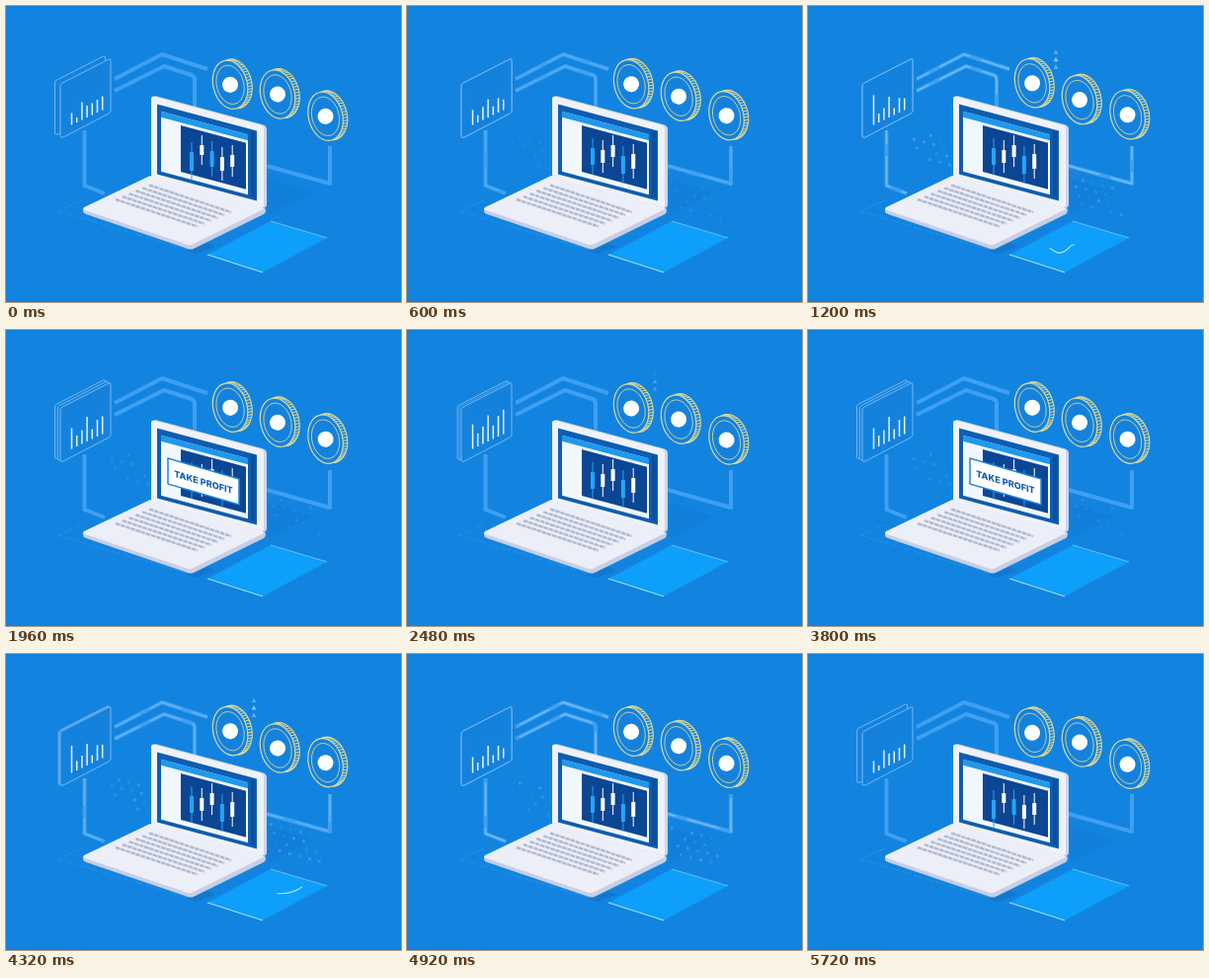
An HTML page for the animation above (5760 ms loop, 400x300 px).

```html
<!DOCTYPE html>
<html lang="en">
<head>
<meta charset="utf-8">
<title>Take profit</title>
<style>
html, body { margin: 0; width: 100%; height: 100%; overflow: hidden; background: #1284df; }
svg { display: block; width: 400px; height: 300px; }
text { font: 800 9.1px Inter, "Open Sans", sans-serif; }
</style>
</head>
<body>
<svg viewBox="0 0 400 300" fill="none" stroke-linejoin="round">
  <rect width="400" height="300" fill="#1284df"/>

  <!-- floor traces and shadow -->
  <path d="M264 174L312 189L266 211Z" fill="#117fda"/>
  <path d="M78 197L53 208L184 247" stroke="#3d9ce8" stroke-width=".7" stroke-dasharray="9 3" opacity=".65"/>
  <path d="M182 248L204 240L212 244L192 251Z" fill="#1078d0"/>

  <g id="cables" stroke="#3f9ff1" stroke-width="4"></g>
  <g id="flow" stroke="#9bd0fb" stroke-width="1.4" stroke-dasharray="34 12"></g>

  <g id="dots" fill="#5598e2"></g>
  <g id="panel"></g>
  <g id="bars" stroke="#e6f3ff" stroke-width="1.5"></g>
  <g id="coins"></g>
  <g id="arrows" fill="#8cc6f8"></g>

  <!-- card -->
  <path d="M204 252L268 218L325 235L260 270Z" fill="#0d9ff9"/>
  <path d="M204 252L260 270" stroke="#b5e2ff" stroke-width="1"/>
  <path d="M268 218L325 235" stroke="#79cbfb" stroke-width=".8"/>
  <path id="wave" d="M226 256C232 247 238 241 244 245S253 252 259 249S265 242 269 242S286 246 300 236"
    pathLength="100" stroke="#b9e4ff" stroke-width="1.2"/>

  <!-- laptop base -->
  <path d="M78 205V208Q78 210 81 211L184 246Q187 247 190 246L261 211Q263 210 263 206Z" fill="#c6cfe6"/>
  <path d="M79 204L146 172L263 205L190 241Q187 243 184 242L80 207Q77 206 79 204Z" fill="#eceef8"/>
  <g id="keys" stroke="#b3bbcf" stroke-width="2.5" stroke-dasharray="4.6 .8"></g>

  <!-- laptop lid -->
  <g transform="matrix(1 .267 0 1 147 91)">
    <rect x="1" y="-1" width="116" height="84" rx="4" fill="#cdd6ec"/>
    <rect width="114" height="83" rx="3" fill="#f0f2fb"/>
    <rect x="6" y="7" width="101" height="71" fill="#0e5db0"/>
    <rect x="101" y="9" width="4" height="66" fill="#0c4f9d"/>
    <rect x="10" y="13" width="88" height="61" fill="#f1f7ff"/>
    <rect x="10" y="13" width="88" height="6" fill="#1e98ee"/>
    <rect x="30" y="22" width="66" height="47" fill="#0b4695"/>
  </g>
  <g id="candles"></g>
  <g id="popup" transform="matrix(1 .29 0 1 164 130)">
    <rect width="72" height="26" fill="#fff" stroke="#1b86df" stroke-width="1.5"/>
    <text x="36" y="17" text-anchor="middle" fill="#0f5fb4">TAKE PROFIT</text>
  </g>
</svg>
<script>
const LOOP = 5760, HALF = LOOP / 2;
const $ = id => document.getElementById(id);

function set(el, attrs) {
  for (const k in attrs) el.setAttribute(k, attrs[k]);
}
function add(parent, tag, attrs) {
  const el = document.createElementNS("http://www.w3.org/2000/svg", tag);
  set(el, attrs);
  parent.appendChild(el);
  return el;
}
const clamp = x => Math.max(0, Math.min(1, x));
const ease = x => x * x * (3 - 2 * x);
const ramp = (t, a, b) => ease(clamp((t - a) / (b - a)));
const gate = (t, a, b, c, d) => ramp(t, a, b) * (1 - ramp(t, c, d));

// Eased value lists: each step is [time, values]
function sample(steps, t) {
  let i = 0;
  while (i < steps.length - 2 && t >= steps[i + 1][0]) i++;
  const [a, from] = steps[i], [b, to] = steps[i + 1];
  const k = ramp(t, a, b);
  return from.map((v, n) => v + (to[n] - v) * k);
}

const BAR_STEPS = [
  [0, [12, 5, 18, 12, 12, 13, 14]],
  [840, [16, 8, 12, 20, 8, 15, 10]],
  [1200, [30, 9, 12, 21, 7, 15, 12]],
  [1900, [21, 11, 14, 25, 10, 17, 18]],
  [2060, [21, 11, 14, 25, 10, 17, 18]],
  [2680, [26, 14, 19, 27, 15, 22, 27]],
  [2880, [26, 14, 19, 27, 15, 22, 27]]
];
// top and height of each candle body
const CANDLE_STEPS = [
  [0, [148, 19, 141, 10, 147, 16, 153, 14, 151, 12]],
  [60, [148, 19, 141, 10, 147, 16, 153, 14, 151, 12]],
  [600, [144, 17, 146, 13, 141, 12, 152, 18, 150, 15]],
  [2880, [144, 17, 146, 13, 141, 12, 152, 18, 150, 15]]
];

const CABLES = [
  "M110 74L158 49L204 64",
  "M110 86L160 61L188 70Q191 71 191 75V103",
  "M79.5 126V182L100 190",
  "M328 142V180L264 162"
];
CABLES.forEach(d => {
  add($("cables"), "path", { d });
  add($("flow"), "path", { d });
});

// panel layers, back to front
const layers = [2, 1, 0].map(() => add($("panel"), "path", {
  d: "M57 78L104 54Q106 53 106 55V106Q106 108 104 109L58 133Q55 134 55 132V81Q55 79 57 78Z",
  fill: "#1482dd", stroke: "#82bcf2", "stroke-width": .9
}));
const bars = BAR_STEPS[0][1].map(() => add($("bars"), "path", {}));

const candles = [0, 1, 2, 3, 4].map(() => ({
  wick: add($("candles"), "path", { "stroke-width": 1 }),
  body: add($("candles"), "rect", { width: 4, rx: .6 })
}));

for (let r = 0; r < 6; r++) {
  add($("keys"), "path", { d: `M${145 - 6.8 * r} ${181.5 + 2.9 * r}l83 27.5` });
}

function coin(x, y, bob) {
  const g = add($("coins"), "g", { stroke: "#dcd89a" });
  const disc = (cx, rx, ry, w) => add(g, "ellipse", { cx, rx, ry, fill: "#1482dd", "stroke-width": w });
  disc(2.4, 17.4, 25.3, 1.1);
  for (let a = -84; a <= 84; a += 7) {
    const q = a * Math.PI / 180, px = 17.4 * Math.cos(q), py = 25.3 * Math.sin(q);
    add(g, "path", { d: `M${px - 2} ${py}h4.4`, "stroke-width": 1 });
  }
  disc(-2, 17.2, 25, 1.2);
  disc(-2, 13.7, 20, .8);
  add(g, "circle", { cx: -2, r: 8, fill: "#fff", stroke: "none" });
  return { g, x, y, bob };
}
const coins = [coin(229, 78.5, .8), coin(277, 92, -3), coin(325.5, 110.5, .8)];

const arrows = [0, 1, 2].map(() => add($("arrows"), "path", { d: "M0 -2.6L2.4 1.8H-2.4Z" }));

let seed = 7;
const rand = () => (seed = seed * 16807 % 2147483647) / 2147483647;
const dots = [];
function dotField(x, y, cols, rows) {
  for (let r = 0; r < rows; r++) for (let c = 0; c < cols; c++) {
    if (rand() < .2) continue;
    dots.push({
      el: add($("dots"), "rect", { x: x + c * 10 + r * 3, y: y + c * 2.6 + r * 9, width: 2.7, height: 2.7 }),
      phase: rand() * 6.28
    });
  }
}
dotField(103, 126, 4, 4);
dotField(267, 174, 5, 4);

function draw(now) {
  const loop = now % LOOP;
  const t = HALF - Math.abs(HALF - loop); // plays forward, then back

  const spread = t < 900 ? 1 - ramp(t, 0, 350) : gate(t, 1240, 1760, 2300, 2800);
  layers.forEach((el, i) => {
    const k = (2 - i) / 2 * spread;
    set(el, { transform: `translate(${-5.5 * k} ${-3 * k})` });
  });
  // the middle layer only shows in the full stack
  layers[1].style.opacity = gate(t, 1240, 1600, 2300, 2700);

  sample(BAR_STEPS, t).forEach((h, i) =>
    set(bars[i], { d: `M${66.5 + i * 5.2} ${120.5 - i * 2.5}v${-h}` }));

  const pose = sample(CANDLE_STEPS, t), swap = t > 300;
  candles.forEach(({ wick, body }, i) => {
    const x = 188 + i * 10.3, y = pose[2 * i], h = pose[2 * i + 1];
    const blue = i === 0 || i === (swap ? 3 : 2);
    const color = blue ? "#25a5f5" : "#fff";
    set(wick, { d: `M${x} ${y - 10}v${h + 20}`, stroke: color });
    set(body, { x: x - 2, y, height: h, fill: color });
  });
  $("popup").style.opacity = gate(t, 1560, 1800, 2240, 2480);

  const swing = Math.cos(t / HALF * 2 * Math.PI);
  coins.forEach(({ g, x, y, bob }) =>
    set(g, { transform: `translate(${x} ${y + bob * swing}) rotate(-14)` }));

  const arrowsOn = gate(t, 940, 1080, 1700, 1840) + ramp(t, 2420, 2560);
  const rise = 2 + (t - 1200) * .031 + 225;
  arrows.forEach((el, i) => {
    const p = (rise + 7.5 * i) % 22.5;
    set(el, { transform: `translate(251 ${64 - p})` });
    el.style.opacity = arrowsOn * clamp(Math.min(p / 3, (22.5 - p) / 9));
  });

  const dataOn = gate(t, 450, 800, 1300, 2600);
  dots.forEach(({ el, phase }) => {
    el.style.opacity = dataOn * (.5 + .35 * Math.sin(t / 130 + phase));
    set(el, { transform: `translate(0 ${(1000 - t) * .006})` });
  });
  $("flow").style.opacity = .6 * gate(t, 450, 800, 1300, 1700);
  set($("flow"), { "stroke-dashoffset": -t * .06 });

  const pos = 28 + (t - 1200) * .17;
  set($("wave"), { "stroke-dasharray": "35 300", "stroke-dashoffset": -pos });
  $("wave").style.opacity = pos > -35 && pos < 100 ? gate(t, 860, 1040, 1400, 1600) : 0;
}

const start = performance.now();
function tick() {
  draw(performance.now() - start);
  requestAnimationFrame(tick);
}
draw(0);
requestAnimationFrame(tick);
</script>
</body>
</html>
```
